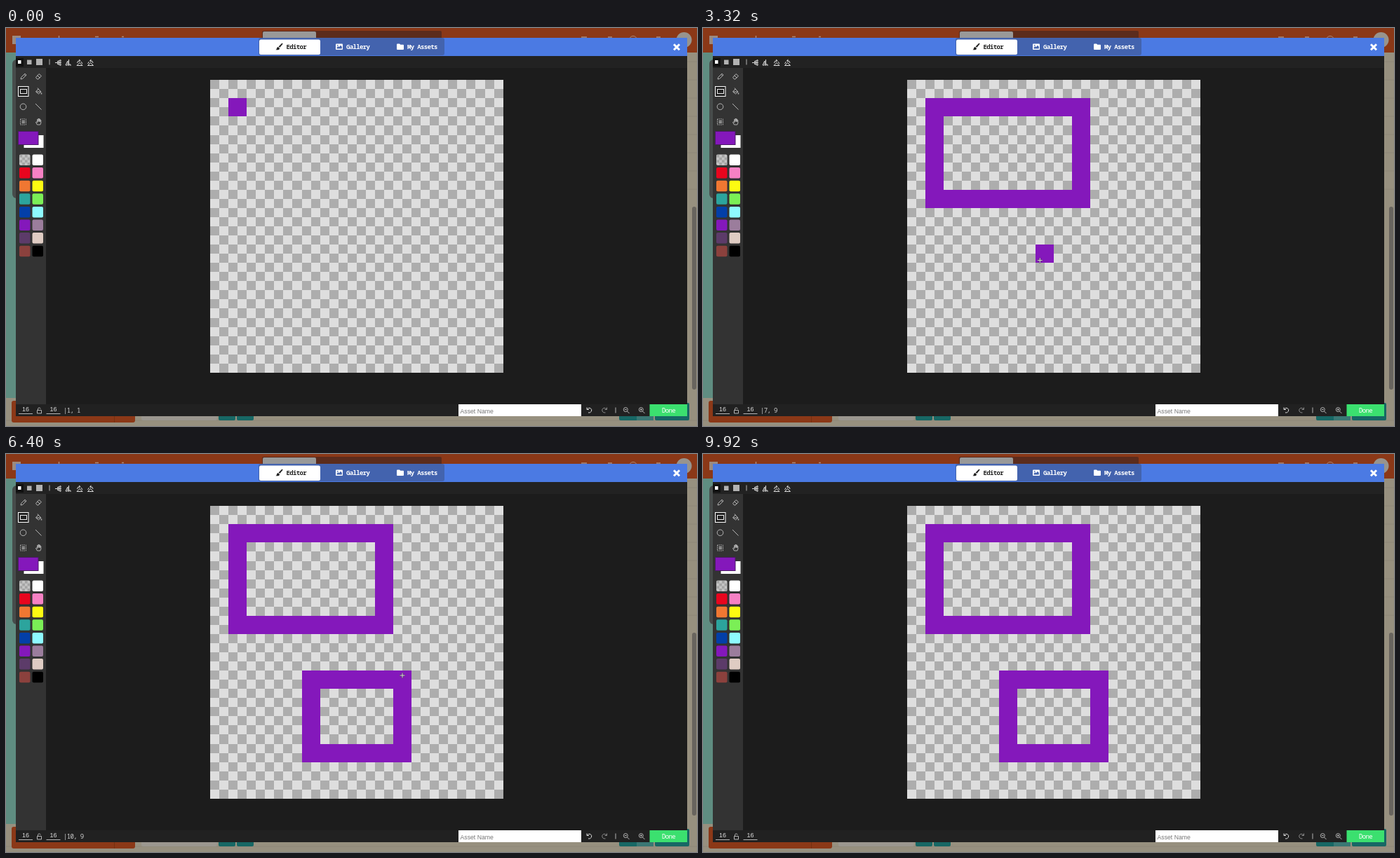
Animation, 985 px wide and 568 px high, one loop 9.96 s. Source, as an HTML page:

```html
<!DOCTYPE html>
<html lang="en">
<head>
<meta charset="utf-8">
<title>Sprite editor</title>
<style>
  html, body { margin: 0; width: 100%; height: 100%; overflow: hidden; background: #1c1c1c; }
  svg { display: block; width: 985px; height: 568px; }
  text { white-space: pre; }
  .mono { font: 9px "Noto Sans Mono", "DejaVu Sans Mono", monospace; letter-spacing: -.65px; }
  .bold { font-weight: 600; }
  .sans { font-family: "Liberation Sans", Arial, sans-serif; }
  .line { fill: none; stroke: #b5b5b5; stroke-width: 1; }
</style>
</head>
<body>
<svg viewBox="0 0 985 568">
  <!-- dimmed page -->
  <rect width="985" height="568" fill="#97907f"/>
  <path d="M971 48h14M971 74h14M971 100h14M971 126h14M971 152h14M971 178h14M971 204h14M971 230h14M0 560h985" stroke="#8e8778"/>
  <rect width="985" height="35" fill="#8b3817"/>
  <rect y="35" width="14" height="493" fill="#5f8d81"/>
  <rect x="9" y="45" width="20" height="198" rx="6" fill="#474c4b"/>
  <rect x="978" y="255" width="6" height="261" rx="3" fill="#68645e"/>
  <rect x="9" y="11" width="12" height="12" fill="#9b8a81"/>
  <path d="M75.500 11v8M127 12.500h5M165 12.500h3M820 13h8M858 13h6M927 13h6" stroke="#aa8a7b" stroke-width="1.500"/>
  <circle cx="894" cy="17" r="5.500" fill="none" stroke="#aa8a7b"/>
  <circle cx="966.500" cy="17" r="11" fill="#97948e"/>
  <rect x="365" y="4" width="256" height="14" rx="2" fill="#5b2c1d"/>
  <rect x="366" y="5" width="76" height="12" rx="2" fill="#999"/>
  <rect x="8" y="532" width="176" height="31" rx="3" fill="#8b3817"/>
  <path d="M154.500 554v9" stroke="#74300f"/>
  <rect x="193" y="532" width="108" height="28" rx="2" fill="#9b978f"/>
  <g fill="#176764">
    <rect x="303" y="535" width="24" height="25" rx="2"/>
    <rect x="329" y="535" width="24" height="25" rx="2"/>
    <rect x="874" y="535" width="49" height="25" rx="2"/>
    <rect x="925" y="535" width="49" height="25" rx="2"/>
  </g>
  <rect x="899" y="554" width="24" height="6" fill="#3a7774"/>

  <!-- dialog -->
  <rect x="14" y="14" width="957" height="540" fill="#1c1c1c"/>
  <rect x="14" y="14" width="957" height="26" fill="#4b7ae3"/>
  <rect x="14" y="40" width="957" height="17" fill="#222"/>
  <rect x="14" y="57" width="43" height="480" fill="#333"/>
  <rect x="14" y="537" width="957" height="17" fill="#212121"/>

  <!-- tabs -->
  <rect x="360" y="14" width="265" height="25" rx="3" fill="#4363ae"/>
  <rect x="361" y="16.500" width="87" height="21.500" rx="2.500" fill="#fff"/>
  <g class="mono bold" fill="#fff">
    <text x="399.500" y="30" fill="#222">Editor</text>
    <text x="485" y="30">Gallery</text>
    <text x="572" y="30">My Assets</text>
  </g>
  <path d="M388.500 26.500l4.500-4.500q1.500-.8 1.500.7l-4 5zM388 27l2 2q0 3-5.500 2.200 1.500-.8 1.500-2.500 .5-1.700 2-1.700z" fill="#222"/>
  <rect x="470" y="22.500" width="10" height="8.500" rx="1" fill="#fff"/>
  <path d="M471.500 29.500v-1.500l2-2 1.300 1.300 2.200-2.600 1.800 2v2.800z" fill="#4363ae"/>
  <circle cx="472.800" cy="24.800" r=".9" fill="#4363ae"/>
  <path d="M557 30v-6.500q0-1 1-1h3l1.300 1.300h3.700q1 0 1 1v5.200q0 1-1 1h-8q-1 0-1-1z" fill="#fff"/>
  <path d="M952 23.200l8 8M960 23.200l-8 8" stroke="#fff" stroke-width="3"/>

  <!-- brush sizes and transforms -->
  <rect x="14" y="43" width="11" height="12" fill="#111"/>
  <rect x="17" y="46" width="4.500" height="5" fill="#fff"/>
  <path d="M30 45.500h6.500v6.500h-6.500zM43 44h9v9h-9z" fill="#b2b2b2"/>
  <path class="line" d="M62 44.500v8"/>
  <path class="line" stroke-width=".9" d="M70 49.500h9M78 45.500v2.500l-5 0zM78 51v2.500l-5-2.500z" style="stroke:#ddd"/>
  <path class="line" d="M89.500 45v9M88 47v6h-3zM91 51v2h2" style="stroke:#ddd"/>
  <g id="turn" class="line" style="stroke:#ddd">
    <path d="M101 53.500h8l-4-4zM101.500 50q0-3.500 4-3.500M104 45l2 1.500-2 2M107 48l2 3"/>
  </g>
  <use href="#turn" transform="translate(225.500 0) scale(-1 1)"/>

  <!-- tools -->
  <g class="line">
    <path d="M21 73l.7-2.600 5.300-5.300 2 2-5.300 5.300zM25.700 66.300l2 2"/>
    <path d="M42.500 70.500l4.500-5 3.500 3-4.500 4.500h-1.500zM44.800 68l3.400 3"/>
    <rect x="17.500" y="83.500" width="14.500" height="14" fill="#222" style="stroke:#fff"/>
    <rect x="20.500" y="87.500" width="9" height="6" style="stroke:#eee"/>
    <path d="M42.500 91l3.500-4 4 4-3.500 3zM45 85.500l2 2.500M43 91h6"/>
    <path d="M50.500 92.500v2" stroke-width="1.500"/>
    <circle cx="24.500" cy="112.300" r="4.300"/>
    <path d="M42 108l8.500 8.500"/>
    <rect x="20.500" y="130" width="8" height="8" stroke-dasharray="1.500 1"/>
    <path d="M22.500 132.500h4.500M22.500 134h4.500M22.500 135.500h4.500"/>
    <path d="M44.500 138l-2-3.500 1-.5 1.200 1v-4.500h1.200v3-4h1.300v4-3.500h1.300v4-2.500h1.300v4l-1 2.500z"/>
  </g>
  <rect x="25.500" y="153" width="28" height="18" fill="#fff"/>
  <rect x="17.500" y="147.500" width="28.500" height="19" fill="#8418bb" stroke="#4b1a66"/>
  <g id="palette"></g>

  <!-- status bar -->
  <g class="sans" font-size="9" fill="#ddd" text-anchor="middle">
    <text x="28" y="547">16</text>
    <text x="67.500" y="547">16</text>
  </g>
  <path class="line" d="M18 550.500h20M57.500 550.500h20"/>
  <path class="line" d="M44.500 545.500h6v4.500h-6zM45.500 545v-1.500q0-1.500 2-1.500 1.500 0 1.700 1.500"/>
  <text id="status" class="mono" x="82" y="549" fill="#d0d0d0"></text>
  <rect x="645" y="537" width="175" height="17" fill="#fff"/>
  <text class="sans" x="647.500" y="550" font-size="8.700" fill="#777">Asset Name</text>
  <path class="line" d="M828 541.500v3h3M828.500 544q2-2.500 4.500-1.500 2.500 1.500 1.500 4.500-1.500 2.500-4.500 2" style="stroke:#ddd"/>
  <path class="line" d="M856.500 541.500v3h-3M856 544q-2-2.500-4.500-1.500-2.500 1.500-1.500 4.500 1.500 2.500 4.500 2" style="stroke:#888"/>
  <path class="line" d="M869 541.500v8"/>
  <g id="zoom" class="line">
    <circle cx="883.300" cy="544.600" r="3"/>
    <path d="M885.500 547l3 3M881.800 544.600h3"/>
  </g>
  <use href="#zoom" x="22"/>
  <path class="line" d="M905.300 543.100v3"/>
  <rect x="917.500" y="537" width="53.500" height="17" fill="#3be06f"/>
  <text class="mono" x="935" y="548.500" fill="#fff">Done</text>

  <!-- drawing area -->
  <rect x="291" y="74" width="418" height="418" fill="#dedede"/>
  <path id="checks" fill="#adadad" shape-rendering="crispEdges"/>
  <path id="ink" fill="#8418bb" fill-rule="evenodd" shape-rendering="crispEdges"/>
  <g id="cursor" fill="none">
    <path d="M-4 0h8M0-4v8" stroke="#333" stroke-width="2.400" opacity=".55"/>
    <path d="M-3.500 0h7M0-3.500v7" stroke="#ddd" stroke-width="1"/>
  </g>
</svg>
<script>
const LOOP = 9960, CELL = 26.1, LEFT = 291, TOP = 74.2, SIZE = 16;
const $ = id => document.getElementById(id);
const edgeX = col => Math.round(LEFT + col * CELL);
const edgeY = row => Math.round(TOP + row * CELL);

// Closed box between grid lines
const box = (c0, r0, c1, r1) =>
  `M${edgeX(c0)} ${edgeY(r0)}H${edgeX(c1)}V${edgeY(r1)}H${edgeX(c0)}Z`;

// One-cell-thick frame through two corner cells
function frame(a, b) {
  const [c0, c1] = [Math.min(a.col, b.col), Math.max(a.col, b.col) + 1];
  const [r0, r1] = [Math.min(a.row, b.row), Math.max(a.row, b.row) + 1];
  const hollow = c1 - c0 > 2 && r1 - r0 > 2;
  return box(c0, r0, c1, r1) + (hollow ? box(c0 + 1, r0 + 1, c1 - 1, r1 - 1) : '');
}

let checks = '';
for (let r = 0; r < SIZE * 2; r++)
  for (let c = r % 2; c < SIZE * 2; c += 2)
    checks += box(c / 2, r / 2, c / 2 + .5, r / 2 + .5);
$('checks').setAttribute('d', checks);

const colors = ['#c4c4c4', '#fff', '#e8051e', '#f681c4', '#f07732', '#fdfb12', '#2ca49d', '#7bef56',
  '#033fa8', '#8efaff', '#8418bb', '#9b7d9c', '#5c3b69', '#dfccc3', '#8b413d', '#000'];
let swatches = colors.map((color, i) =>
  `<rect x="${19 + i % 2 * 18.5}" y="${180.5 + (i >> 1) * 18.6}" width="15.5" height="15.5" rx="2" fill="${color}"/>`).join('');
for (let i = 0; i < 16; i++)
  if ((i + (i >> 2)) % 2 === 0)
    swatches += `<rect x="${19.5 + i % 4 * 3.7}" y="${181 + (i >> 2) * 3.7}" width="3.7" height="3.7" fill="#a4a4a4"/>`;
$('palette').innerHTML = swatches;

// Pointer path: time, x, y
const path = [
  [0, 333, 116], [250, 341, 124], [800, 440, 204], [1400, 533, 236], [2700, 533, 236],
  [4000, 420, 441], [4250, 420, 441], [4650, 426, 431], [5000, 426, 431],
  [5600, 422, 325], [5960, 565, 316], [8450, 565, 316], [9300, 724, 392]
];
const ease = p => p * p * (3 - 2 * p);

function pointerAt(t) {
  const i = path.findIndex(key => key[0] > t);
  if (i < 1) return null;
  const [t0, x0, y0] = path[i - 1], [t1, x1, y1] = path[i];
  const p = ease((t - t0) / (t1 - t0));
  return { x: x0 + (x1 - x0) * p, y: y0 + (y1 - y0) * p };
}

function cellAt({ x, y }) {
  const col = Math.floor((x - LEFT) / CELL), row = Math.floor((y - TOP) / CELL);
  return col >= 0 && row >= 0 && col < SIZE && row < SIZE ? { col, row } : null;
}

const strokes = [
  { from: 0, to: 2300, start: { col: 1, row: 1 }, end: { col: 9, row: 6 } },
  { from: 4800, to: 7600, start: { col: 5, row: 13 }, end: { col: 10, row: 9 } }
];

function render(t) {
  const pointer = pointerAt(t);
  const cell = pointer && cellAt(pointer);
  const shapes = strokes.filter(s => t >= s.from)
    .map(s => frame(s.start, t < s.to && cell ? cell : s.end));
  const drawing = strokes.some(s => t >= s.from && t < s.to);
  const onInk = cell && strokes.some(({ from, start, end }) => {
    const inC = cell.col >= Math.min(start.col, end.col) && cell.col <= Math.max(start.col, end.col);
    const inR = cell.row >= Math.min(start.row, end.row) && cell.row <= Math.max(start.row, end.row);
    const border = [start.col, end.col].includes(cell.col) || [start.row, end.row].includes(cell.row);
    return t >= from && inC && inR && border;
  });
  if (cell && !drawing && !onInk) shapes.push(frame(cell, cell));
  $('ink').setAttribute('d', shapes.join(''));

  $('status').textContent = cell ? `|${cell.col}, ${cell.row}` : '';
  $('status').setAttribute('x', 82);
  const shown = cell && t > 250;
  $('cursor').setAttribute('visibility', shown ? 'visible' : 'hidden');
  if (shown) $('cursor').setAttribute('transform', `translate(${pointer.x} ${pointer.y})`);
}

const begin = performance.now();
function tick() {
  render((performance.now() - begin) % LOOP);
  requestAnimationFrame(tick);
}
tick();
</script>
</body>
</html>
```
